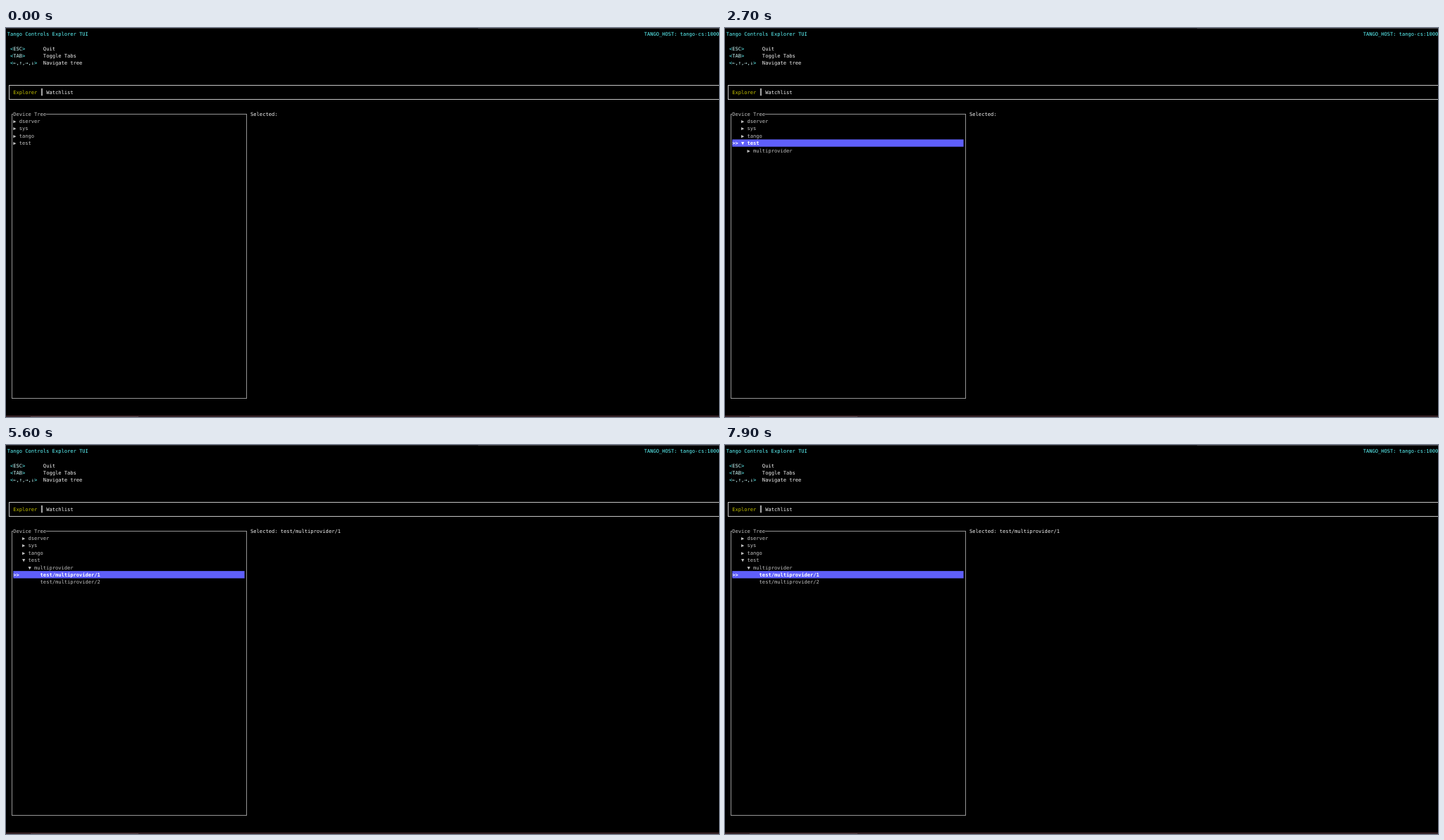
An HTML page with a canvas that plays this animation: 1012x553 px, repeating every 8000 ms.

```html
<!DOCTYPE html>
<html lang="en">
<head>
<meta charset="utf-8">
<title>Tango Controls Explorer TUI</title>
<style>
  html, body { margin: 0; width: 100%; height: 100%; overflow: hidden; background: #000; }
  canvas { display: block; width: 1012px; height: 553px; }
</style>
</head>
<body>
<canvas id="screen" width="1012" height="553"></canvas>
<script>
const ctx = document.getElementById('screen').getContext('2d');
const LOOP = 8000;
const CELL_W = 4.264, CELL_H = 10.36, LEFT = 1.7, TOP = 3;
const FONT = '7.083px "DejaVu Sans Mono", monospace';
const CYAN = '#5ffdff', WHITE = '#f4f4f4', GREY = '#c0c0c0',
      YELLOW = '#c7c400', BLUE = '#5f5ffa', BRIGHT = '#ffffff';

// Each step changes part of the interface state from time `at` onward.
const steps = [
  { at: 0, cursor: -1, testOpen: false, groupOpen: false, table: false },
  { at: 1200, cursor: 0 },
  { at: 1500, cursor: 1 },
  { at: 1900, cursor: 2 },
  { at: 2100, cursor: 3 },
  { at: 2500, testOpen: true },
  { at: 3200, cursor: 4 },
  { at: 3500, groupOpen: true },
  { at: 4100, cursor: 5 },
  { at: 4400, cursor: 6 },
  { at: 5000, cursor: 5 },
  { at: 6300, cursor: -1, table: true },
  { at: 7900, cursor: 5, table: false }
];

const colX = col => LEFT + col * CELL_W;
const rowY = row => TOP + row * CELL_H;
const stateAt = t => Object.assign({}, ...steps.filter(s => s.at <= t));

function text(str, col, row, color, bold) {
  ctx.font = (bold ? 'bold ' : '') + FONT;
  ctx.fillStyle = color;
  ctx.fillText(str, colX(col), rowY(row) + 7.8);
}

function rect(x, y, w, h, color) {
  ctx.fillStyle = color;
  ctx.fillRect(x, y, w, h);
}

function highlight(from, to, row) {
  rect(colX(from), rowY(row), (to - from) * CELL_W, CELL_H, BLUE);
}

// Border running through the centres of the outer cells.
function frame(c0, r0, c1, r1, color) {
  const [x0, x1] = [c0, c1].map(c => Math.round(colX(c + 0.5)));
  const [y0, y1] = [r0, r1].map(r => Math.round(rowY(r + 0.5)));
  for (const y of [y0, y1]) rect(x0, y, x1 - x0, 1, color);
  for (const x of [x0, x1]) rect(x, y0, 1, y1 - y0 + 1, color);
}

function shortcut(key, label, col, row, labelCol) {
  text('<', col, row, CYAN);
  text(key, col + 1, row, '#c9f6f6');
  text('>', col + 1 + key.length, row, CYAN);
  text(label, labelCol, row, WHITE);
}

function drawChrome() {
  rect(0, 0, 1012, 553, '#000');
  rect(0, 0, 670, 1, '#2b292d');
  rect(670, 0, 342, 1, '#49474b');
  rect(0, 551, 1012, 1, '#47282e');
  rect(0, 552, 1012, 1, '#2a2023');
  rect(35, 552, 153, 1, '#4a4044');

  text('Tango Controls Explorer TUI', 0, 0, CYAN);
  text('TANGO_HOST: tango-cs:10000', 212, 0, CYAN);
  shortcut('ESC', 'Quit', 1, 2, 12);
  shortcut('TAB', 'Toggle Tabs', 1, 3, 12);
  shortcut('←,↑,→,↓', 'Navigate tree', 1, 4, 12);

  frame(0, 7, 238, 9, '#c4c4c4');
  text('Explorer', 2, 8, YELLOW);
  rect(49.8, rowY(8), 2.2, CELL_H, '#a0a0a0');
  text('Watchlist', 13, 8, WHITE);

  frame(1, 11, 79, 50, '#959595');
  rect(colX(2), rowY(11), 11 * CELL_W, CELL_H, '#000');
  text('Device Tree', 2, 11, GREY);
}

function treeRows(s) {
  const rows = ['dserver', 'sys', 'tango'].map(name => ({ name, depth: 0, mark: '▶' }));
  rows.push({ name: 'test', depth: 0, mark: s.testOpen ? '▼' : '▶' });
  if (s.testOpen) rows.push({ name: 'multiprovider', depth: 1, mark: s.groupOpen ? '▼' : '▶' });
  if (s.groupOpen) {
    for (const n of [1, 2]) rows.push({ name: 'test/multiprovider/' + n, depth: 2, mark: '' });
  }
  return rows;
}

function drawTree(s, rows) {
  const indent = s.cursor < 0 ? 2 : 5;
  rows.forEach((item, i) => {
    const row = 12 + i, active = i === s.cursor;
    const col = indent + item.depth * 2;
    const color = active ? BRIGHT : GREY;
    if (active) {
      highlight(2, 79, row);
      text('>>', 2, row, color, true);
    }
    text(item.mark, col, row, color, active);
    text(item.name, col + 2, row, color, active);
  });
}

function drawTable() {
  shortcut('c', 'Command List', 80, 2, 91);
  shortcut('w', 'Watch Attribute', 80, 3, 91);
  text('Attributes, selected: test/multiprovider/1', 81, 11, WHITE);
  text('Name', 82, 12, CYAN);
  text('Description', 162, 12, CYAN);

  highlight(80, 238, 14);
  text('>>random_float', 80, 14, BRIGHT, true);
  text('Return a random number', 162, 14, BRIGHT, true);
  ['State', 'Status'].forEach((name, i) => {
    text(name, 82, 15 + i, WHITE);
    text('No description', 162, 15 + i, WHITE);
  });
}

function draw(t) {
  const s = stateAt(t), rows = treeRows(s);
  drawChrome();
  drawTree(s, rows);
  if (s.table) {
    drawTable();
  } else {
    const device = s.cursor > 4 ? rows[s.cursor].name : '';
    text('Selected: ' + device, 81, 11, WHITE);
  }
}

ctx.textRendering = 'geometricPrecision';
const start = performance.now();
function tick() {
  draw((performance.now() - start) % LOOP);
  requestAnimationFrame(tick);
}
tick();
</script>
</body>
</html>
```
